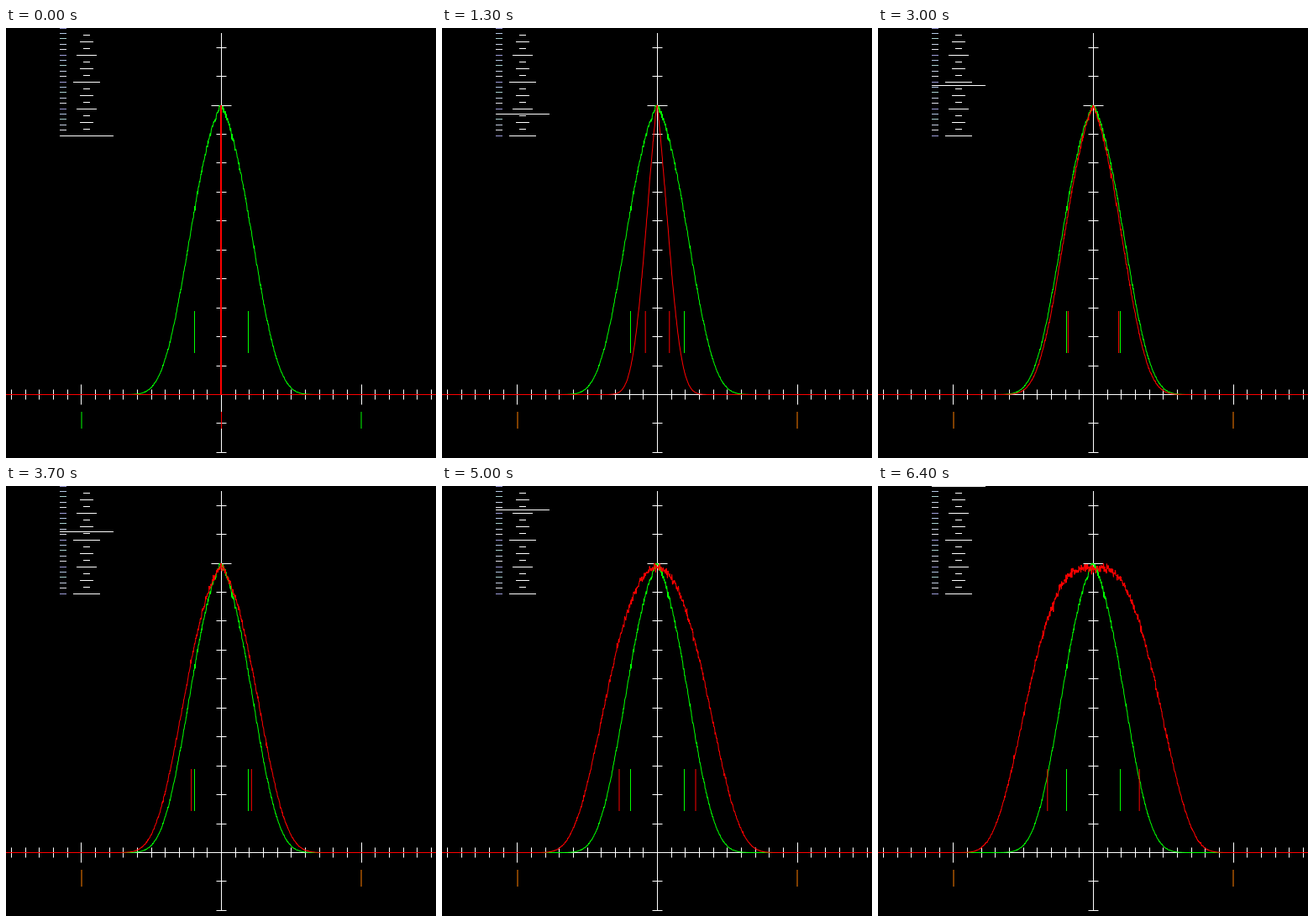
These frames come from a looping animation (512 by 512 pixels, 6500 ms). A matplotlib script:

```python
import numpy as np
import matplotlib
import matplotlib.pyplot as plt
from matplotlib.animation import FuncAnimation
from matplotlib.collections import LineCollection

matplotlib.rcParams["path.simplify"] = False

SIZE, DPI, STEPS = 512, 100, 65
PX = 72 / DPI
CX, BASE, PEAK, UNIT = 256.5, 436.5, 344.5, 500 / 3
GREEN, RED, WHITE = "#00ff00", "#ff0000", "#ffffff"

fig = plt.figure(figsize=(SIZE / DPI, SIZE / DPI), dpi=DPI, facecolor="black")
ax = fig.add_axes([0, 0, 1, 1])
ax.set(xlim=(0, SIZE), ylim=(SIZE, 0))
ax.axis("off")

# histogram bins, measured from the middle of the stage
mid = 640
offsets = 0.4 * np.arange(-mid, mid + 1)


def hline(x0, x1, y):
    return [(x0, y), (x1, y)]


def vline(x, y0, y1):
    return [(x, y0), (x, y1)]


def draw(segs, color, z):
    lines = LineCollection(segs, colors=color, linewidths=PX, zorder=z,
                           capstyle="butt")
    lines.set_snap(False)
    ax.add_collection(lines)
    return lines


def curve(color, z):
    line, = ax.plot(SIZE / 2 + offsets, offsets * 0 + BASE, color=color,
                    lw=PX, zorder=z, solid_joinstyle="bevel")
    line.set_snap(False)
    return line


def density(p):
    """Bell shape: pointed for small p, flat on top for p = 1."""
    x = np.abs(offsets) / UNIT
    squash = 1 - 0.66 * np.minimum(x, 1.2)
    z = x / squash / p
    f = np.exp(-1.1 * z - 1.3 * z * z) / squash ** 2
    return np.where(x < 1, f, 0)


WIDEST = density(1).sum()


def histogram(p, seed):
    """Sampled density, scaled so the highest bin is 1."""
    if p == 0:
        spike = np.zeros(len(offsets))
        spike[mid] = 1
        return spike
    f = density(p)
    noise = 0.0082 * np.sqrt(f.sum() / WIDEST)
    rng = np.random.default_rng(seed)
    f = np.maximum(f + noise * np.sqrt(f) * rng.standard_normal(len(f)), 0)
    return f / f.max()


def spread(p):
    return 76 * p / (1 + 0.39 * p)


def markers(d, y0, y1):
    return [vline(CX - d, y0, y1), vline(CX + d, y0, y1)]


def spread_marks(d):
    return markers(d, 337, 387)


def bound_marks(d):
    return markers(d, 457, 477)


# axes with ticks
grid = [hline(0, SIZE, BASE), vline(CX, 6, 506)]
for i in range(-15, 16):
    r = 12 if abs(i) == 10 else 6
    if i:
        x = round(256 + i * UNIT / 10) + 0.5
        grid.append(vline(x, BASE - r, BASE + r))
for i in range(-2, 13):
    r = 12 if i == 10 else 6
    if i:
        y = round(436 - i * 34.45) + 0.5
        grid.append(hline(CX - r, CX + r, y))

# ruler beside the slider
for y in range(8, 129, 8):
    r = 16 if y % 64 == 0 else 12 if y % 32 == 0 else 8 if y % 16 == 0 else 4
    grid.append(hline(96 - r, 96 + r, y + 0.5))
draw(grid, WHITE, 1)

tints = ["#a0a0dc", "#b4c8e6", "#aad2d2", "#c8d2e6", "#e6e6f0"]
draw([hline(64, 72, int(i * 6.4) + 0.5) for i in range(21)],
     [tints[i % 5] for i in range(21)], 1)

# fixed reference distribution
curve(GREEN, 2).set_ydata(BASE - PEAK * histogram(0.5, 500))
draw(spread_marks(32), GREEN, 2)
draw(bound_marks(166.5), GREEN, 2)

# moving parts
red = curve(RED, 3)
red_spread = draw(spread_marks(0), RED, 3)
red_bounds = draw(bound_marks(0), RED, 3)
slider = draw([hline(64, 128, 128.5)], WHITE, 4)


def update(k):
    p = k / (STEPS - 1)
    red.set_ydata(BASE - PEAK * histogram(p, k))
    red_spread.set_segments(spread_marks(spread(p)))
    red_bounds.set_segments(bound_marks(166.5 if p else 0))
    slider.set_segments([hline(64, 128, 128.5 - 2 * k)])
    return red, red_spread, red_bounds, slider


anim = FuncAnimation(fig, update, frames=STEPS, interval=100, repeat=True,
                     repeat_delay=0, blit=False)
plt.show()
```
